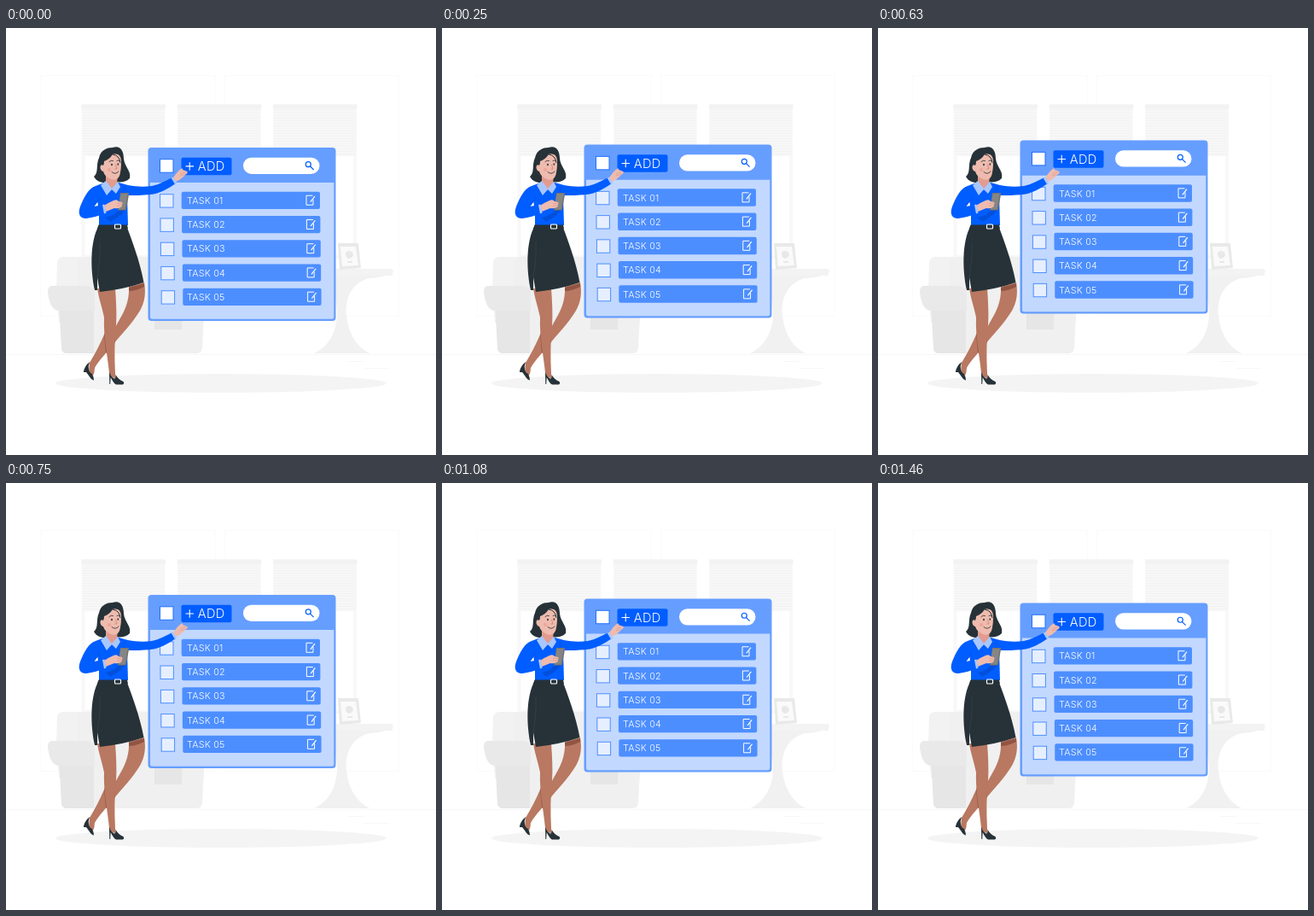
Recreate the animation shown at these times as an HTML page. Size 504 by 500 pixels, loop 1500 ms.

```html
<!DOCTYPE html>
<html lang="en">
<head>
<meta charset="utf-8">
<title>Task board</title>
<style>
html, body { margin: 0; width: 100%; height: 100%; overflow: hidden; background: #fff; }
svg { display: block; width: 504px; height: 500px; }
text { font-family: Inter, "Open Sans", sans-serif; font-weight: 300; letter-spacing: .02em; fill: #fff; }
</style>
</head>
<body>
<svg viewBox="0 0 504 500" xmlns="http://www.w3.org/2000/svg">
  <rect width="504" height="500" fill="#fff"/>

  <g fill="none" stroke="#fafafa">
    <path d="M40.500 55.500H245.500V337.500H40.500ZM256.500 55.500H460.500V337.500H256.500Z"/>
  </g>
  <g id="windows"></g>
  <path d="M0 382.500H504M400 390.500h19M420 398.500h29" stroke="#f7f7f7"/>
  <ellipse cx="252" cy="416" rx="194" ry="11" fill="#f4f4f4"/>

  <!-- armchair -->
  <path d="M59 305L60 275Q60 268 68 268H190Q200 268 200 280V345H62Z" fill="#f2f2f2"/>
  <path d="M84 345V276Q84 268 92 268H190V345Z" fill="#f0f0f0"/>
  <path d="M98 320H233L230 375Q229 381 223 381H98Z" fill="#f0f0f0"/>
  <path d="M174 320H207L206 353H174Z" fill="#e6e6e6"/>
  <path d="M62 322H103V381H71Q66 381 65 376Z" fill="#e6e6e6"/>
  <path d="M54 302H95Q104 302 104 312V331H61Q51 329 49 309Q49 302 54 302Z" fill="#e9e9e9"/>

  <!-- side table and picture -->
  <path d="M340 282H453L454 286Q444 292 426 293C405 298 397 317 399 336C401 358 412 375 427 381H361C377 373 386 360 388 338C389 317 382 297 362 292H340Z" fill="#f1f1f1"/>
  <path d="M340 282H453V290H340Z" fill="#f3f3f3"/>
  <path d="M389 252L413 252L416 281L391 283Z" fill="#e9e9e9"/>
  <path d="M392 256L410 256L413 278L394 279Z" fill="#fafafa"/>
  <path d="M398 265q0-4 4-4t5 4q0 4-5 5q-4-1-4-5Z" fill="#e8e8e8"/>
  <path d="M400 274h6" stroke="#e8e8e8" stroke-width="2"/>

  <g id="panel">
    <rect x="166.500" y="140.200" width="220" height="203" rx="4" fill="#669eff"/>
    <path d="M169 181.300H384.300V338.500Q384.300 341 382 341H171.500Q169 341 169 338.500Z" fill="#c2d8ff"/>
    <rect x="180.500" y="154" width="15.500" height="15.500" fill="#fff" stroke="#1f6fff"/>
    <rect x="205.500" y="152" width="59" height="20.500" rx="2" fill="#005dff"/>
    <path d="M210.500 162.200h9.500M215.250 157.450v9.500" stroke="#fff" stroke-width="1.100"/>
    <text x="224.800" y="167.300" font-size="14.600">ADD</text>
    <rect x="278" y="152" width="89.500" height="19.200" rx="9.600" fill="#fff"/>
    <g fill="none" stroke="#005dff" stroke-width="1.200">
      <circle cx="354.300" cy="160" r="3"/>
      <path d="M356.600 162.300L360.600 166.300"/>
    </g>
    <g id="rows"></g>
  </g>

  <!-- legs -->
  <path d="M144 303L162 298C164 310 163 320 157 331C147 347 136 358 126 370C118 380 109 389 104 398L98 392C104 382 110 371 115 359C120 352 126 354 129 349C135 337 145 325 144 303Z" fill="#b97861"/>
  <path d="M144 304L162 299L162 303Q152 308 144 308Z" fill="#925443"/>
  <path d="M115 359C118 351 122 343 127 346L128 368L117 381Z" fill="#985b49"/>
  <path d="M107 305H128C129 319 130 335 129 349C127 367 127 385 128 405L129 411L122 407L121 404C119 383 114 360 115 339C113 328 109 318 107 305Z" fill="#b97861"/>
  <path d="M98 391L104 397Q104 403 102 407L97 403Z" fill="#b97861"/>
  <path d="M98 391Q92 396 91 402V403L94 403L97 407Q100 412 103 412.500Q103 409 101 405Q98 404 97 400Q96 396 98 391Z" fill="#263238"/>
  <path d="M121 403L121.300 417H122.200L122.700 409Q126 416 129 417.500H137Q139 416 137.500 414Q132 412 128.500 406Q129 412 126 410Q122 407 121 403Z" fill="#263238"/>

  <!-- skirt and belt -->
  <path d="M109 231H141C147 247 157 273 161.500 298Q138 306 110 309L107 292L107 307L104 307C99 284 98 250 109 231Z" fill="#263238"/>
  <path d="M107 292Q111 268 110 250" fill="none" stroke="#37474f" stroke-width=".6"/>

  <!-- hair behind the face -->
  <path d="M109 152C111 143 118 140 125 140C134 137 138 144 138 153C139 163 147 167 145 176C140 181 134 181 127 180C119 183 107 182 103 174C109 169 105 161 109 152Z" fill="#263238"/>

  <!-- jumper -->
  <path d="M105 185Q112 182 119 180L132 181L143 184C153 186 162 186 171 185C180 183 187 179 195 175L199 182C190 188 180 194 169 195C160 196 151 196 142 196L143 231H109V217Z" fill="#005dff"/>
  <path d="M108.500 230.500H142L143 235H107Z" fill="#263238"/>
  <rect x="127.500" y="230" width="7" height="5" rx="1" fill="none" stroke="#fff" stroke-width="1.200"/>
  <path d="M117 222Q129 220 135 209L142 210Q137 219 122 227Z" fill="#0050db"/>
  <path d="M139 186Q137 195 143 196" fill="none" stroke="#0050db" stroke-width=".7"/>

  <!-- neck, collar and face -->
  <path d="M117 170H131L130 184L124 190L117 182Z" fill="#e29c8f"/>
  <path d="M117 179L124 188L131 180L134 186L129 194L124 189L118 196L111 184Z" fill="#a8c7ff"/>
  <path d="M113 156C113 148 121 146 127 147C132 147 135 150 135 156C135 160 135 164 134 169C133 177 128 179 123 177C118 175 115 172 114 168C110 168 109 159 113 158Z" fill="#eebbae"/>
  <path d="M110 163C107 150 115 142 125 142Q133 141 135 150Q130 146 125 148Q121 154 115 156Q115 160 114 161Q111 159 110 163Z" fill="#263238"/>
  <path d="M125 148Q133 149 134 158" fill="none" stroke="#263238" stroke-width="1"/>
  <g fill="#263238">
    <ellipse cx="124" cy="160" rx=".9" ry="1.300"/>
    <ellipse cx="131.300" cy="159.500" rx=".8" ry="1.300"/>
  </g>
  <g fill="none" stroke="#263238" stroke-width=".8" stroke-linecap="round">
    <path d="M121 156.500Q123 154.500 125.500 155.500M130 155.500Q131.500 154.500 133 155.500"/>
    <path d="M124 168.500Q128 172.500 132 168"/>
    <path d="M128.500 160L130 165H128" stroke="#d07f70"/>
  </g>
  <circle cx="121" cy="166" r="2" fill="#eda598"/>

  <!-- pointing hand -->
  <path d="M194.500 177C198 173 201 167 206 164.500Q208 164 207 166L212.500 168Q213.500 170 210 172Q206 177 198.500 180Z" fill="#eebbae"/>
  <path d="M204 171L211 168.500M204 173L210 171.500" stroke="#d9968a" stroke-width=".6"/>
  <path d="M193.500 175.500L196 174.800L200.500 181.500L198 183Z" fill="#a8c7ff"/>

  <!-- phone and near arm -->
  <path d="M134 193H143Q144.500 193 144 195L141 212Q140.700 213.500 139 213.500H131Z" fill="#737373"/>
  <path d="M134.500 194H142.500L139.500 212.500H132Z" fill="#858585"/>
  <path d="M115 208Q121 204 126 202Q130 200 132 203L136 204Q137.500 206 135.500 207L136 209Q132 212 127 211L117 215Z" fill="#eebbae"/>
  <path d="M130 205.500H136M130 208H135" stroke="#d9968a" stroke-width=".6"/>
  <path d="M105 185C97 187 91 199 87 209C84 217 86 223 94 223C102 222 109 220 116 217L114 207L103 209L111 199Z" fill="#005dff"/>
  <path d="M103 209L110 199" stroke="#0050db" stroke-width=".8"/>
  <path d="M113 207L115.500 206.500L117.500 216.500L115 217.500Z" fill="#a8c7ff"/>
</svg>
<script>
const $ = id => document.getElementById(id);
const range = n => [...Array(n).keys()];

function blind(i) {
  const x = 88.5 + i * 112.3;
  const slats = range(18).map(k => `M${x + 1} ${96.5 + k * 3}h96`).join("");
  return `<rect x="${x + 2}" y="94" width="94" height="174" fill="none" stroke="#f8f8f8" stroke-width="4"/>
    <rect x="${x + 1}" y="94" width="96" height="56" fill="#f7f7f7"/>
    <path d="${slats}" stroke="#f3f3f3"/>
    <rect x="${x}" y="89.500" width="98.500" height="5" fill="#f2f2f2"/>`;
}

function row(i) {
  return `<g transform="translate(${i * 0.4} ${i * 28.25})">
    <rect x="180.600" y="195" width="15.400" height="15.400" fill="#e6efff" stroke="#4d8eff"/>
    <rect x="205.700" y="192" width="162.300" height="20.300" rx="2" fill="#4d8eff"/>
    <text x="${212 - i * 0.4}" y="206.200" font-size="10.800">TASK 0${i + 1}</text>
    <path d="M360 201V207.500H352V196.500H359.500" fill="none" stroke="#fff"/>
    <path d="M356.800 204L362 197.300" stroke="#fff" stroke-width="1.200"/>
  </g>`;
}

$("windows").innerHTML = range(3).map(blind).join("");
$("rows").innerHTML = range(5).map(row).join("");

// Linear 10px float, stepped at 24 per second
const STEPS = 36, LIFT = 10, REST = 0.25;

function draw(ms) {
  const step = Math.floor((ms % 1500) * 0.024 + 0.1) + 1;
  const p = (step % STEPS) / STEPS;
  const y = REST - LIFT * 2 * Math.min(p, 1 - p);
  $("panel").setAttribute("transform", `translate(0 ${y.toFixed(3)})`);
}

let start;
function tick(now) {
  start ??= now;
  draw(Math.max(0, now - start));
  requestAnimationFrame(tick);
}
draw(0);
requestAnimationFrame(tick);
</script>
</body>
</html>
```
